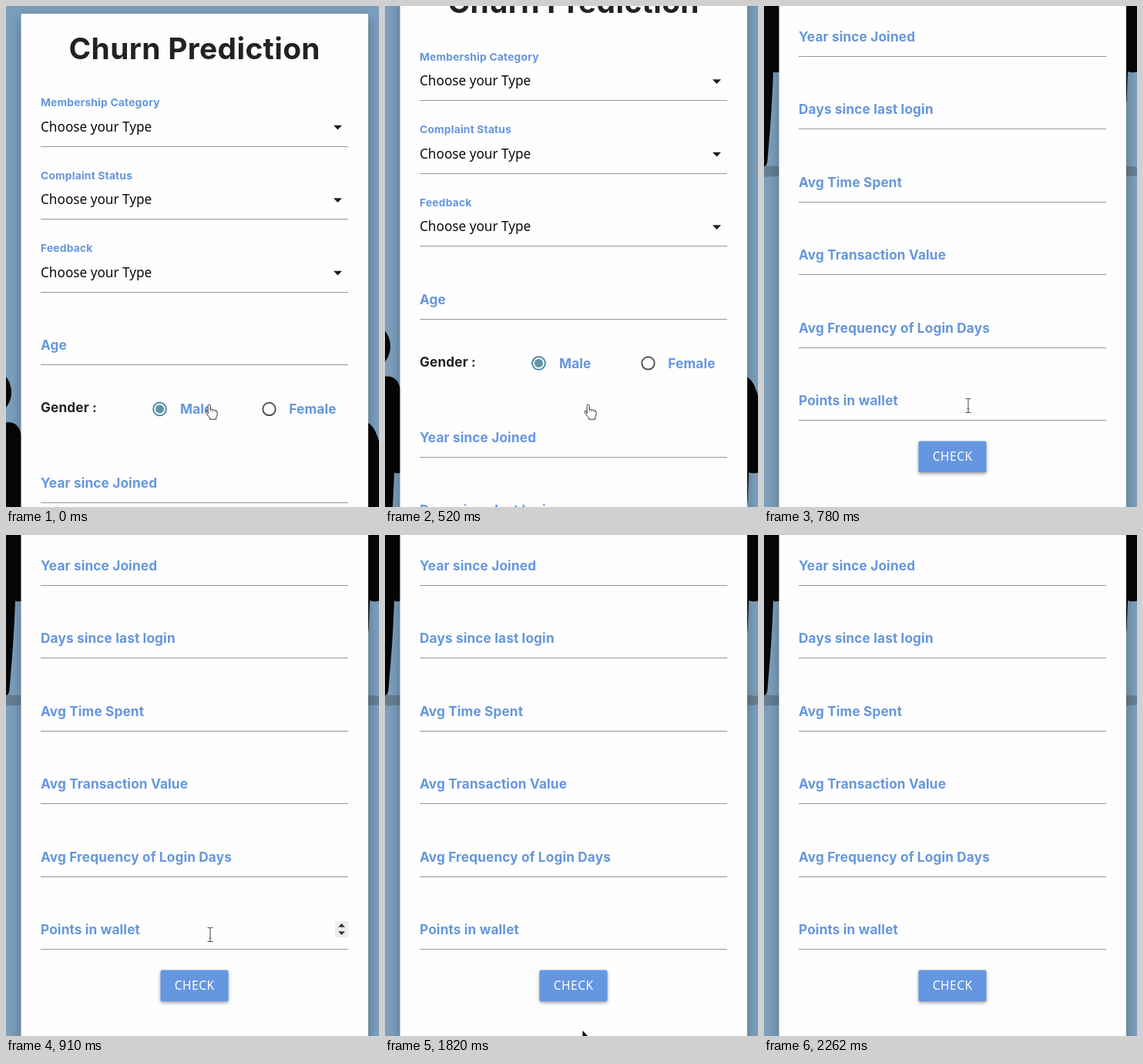
These frames come from a looping animation (484x650 px, 2470 ms). An HTML page:

```html
<!DOCTYPE html>
<html lang="en">
<head>
<meta charset="utf-8">
<title>Churn Prediction</title>
<style>
  html, body { margin: 0; width: 100%; height: 100%; overflow: hidden; background: #7b9fbd; }
  svg { display: block; width: 484px; height: 650px; }
  text { font-family: Inter, "Open Sans", sans-serif; font-weight: 650; font-optical-sizing: none; fill: #6596dd; }
  .title { font-size: 38.8px; font-weight: 700; letter-spacing: .4px; text-anchor: middle; fill: #222; }
  .field { font-size: 17.2px; letter-spacing: .15px; }
  .small { font-size: 13.8px; letter-spacing: .2px; }
  .dark { fill: #222; }
  .choice { font: 450 17.2px "Noto Sans", "Open Sans", sans-serif; fill: #0c0c0c; }
  .button { font: 400 15.5px "Noto Sans", "Open Sans", sans-serif; letter-spacing: .5px; text-anchor: middle; fill: #fff; }
  .line { fill: #969696; shape-rendering: crispEdges; }
  .card { fill: #fefefe; filter: drop-shadow(0 5px 8px rgba(0,0,0,.3)); }
  .raised { fill: #6596e0; filter: drop-shadow(0 2px 2px rgba(0,0,0,.38)); }
</style>
</head>
<body>
<svg viewBox="0 0 484 650">
  <rect width="484" height="650" fill="#7b9fbd"/>
  <g id="page">
    <g fill="#667f92">
      <ellipse cx="-30" cy="794" rx="90" ry="7.5"/>
      <ellipse cx="430" cy="794" rx="75" ry="8"/>
    </g>
    <g fill="#060708">
      <circle cx="-25" cy="501" r="32"/>
      <path d="M-10 540H3C12 540 17 545 20 556V665.5H17Q13 666.5 12 664.5C10.5 710 7.5 745 4.5 780Q4 788-2 788H-10Z"/>
      <path d="M460 541H470C477 545 482 555 486 573V664.5Q479 667 472 664.5L470.5 704H460Z"/>
    </g>
    <rect class="card" x="19.5" y="10" width="450.5" height="1260" rx="2"/>
    <text class="title" x="244.7" y="68.5">Churn Prediction</text>
    <g id="form"></g>
    <text class="field dark" x="45" y="527">Gender :</text>
    <circle cx="199.5" cy="522.9" r="8.4" fill="none" stroke="#4b8cad" stroke-width="2"/>
    <circle cx="199.5" cy="522.9" r="5.6" fill="#5f95a8"/>
    <text class="field" x="226" y="529">Male</text>
    <circle cx="341.5" cy="522.9" r="8.2" fill="none" stroke="#555" stroke-width="2"/>
    <text class="field" x="367.3" y="529">Female</text>
    <rect class="raised" x="200.5" y="1144" width="88" height="40.5" rx="2"/>
    <text class="button" x="244.7" y="1169.7">CHECK</text>
  </g>
  <g id="spinner">
    <rect x="-8.5" y="-10.5" width="17" height="21" fill="#ededed"/>
    <path d="M-4.3-2.8L0-7.5L4.3-2.8ZM-4.3 2.8L0 7.5L4.3 2.8Z" fill="#333"/>
  </g>
  <g id="hand" fill="#fff" stroke="#333" stroke-linejoin="round">
    <path d="M3.7 12V2Q3.7 .4 5.2 .4T6.8 2V7.2Q8.4 6 9.8 7.4Q11.4 6.6 12.7 8.2Q15.6 7.6 15.7 10.4V13.5Q15.4 16 14.2 17.3V19.6H6V17.5Q3.7 15.5 2.4 13L.6 10.5Q.1 9 1.4 8.7T3.7 10.6Z"/>
    <path d="M6.8 7V10M9.8 7.5V10.2M12.7 8.3V10.6" fill="none" stroke="#777" stroke-width=".8"/>
  </g>
  <path id="arrow" d="M0 0V15.2L3.5 12L6.2 18L8.5 17L5.8 11.2H10.2Z" fill="#0b0b0b" stroke="#fff" stroke-width=".8"/>
  <path id="beam" d="M-3.5-9H-1Q0-9 0-8Q0-9 1-9H3.5M0-8V8M-3.5 9H-1Q0 9 0 8Q0 9 1 9H3.5M-1.5 4.5H1.5" fill="none" stroke="#555" stroke-width="1.1"/>
</svg>
<script>
const $ = id => document.getElementById(id);
const PITCH = 94.5, LOOP = 2470;

const label = (name, cls, y) => `<text class="${cls}" x="45" y="${y}">${name}</text>`;
const rule = y => `<rect class="line" x="45" y="${y - .7}" width="399" height="1"/>`;
const input = (name, y) => label(name, "field", y - 20) + rule(y);
const select = (name, y) => label(name, "small", y - 52.5)
  + label("Choose your Type", "choice", y - 20)
  + `<path d="M425 ${y - 27.8}h11l-5.5 5.7z" fill="#1c1c1c"/>` + rule(y);

const selects = ["Membership Category", "Complaint Status", "Feedback"];
const inputs = ["Year since Joined", "Days since last login", "Avg Time Spent",
  "Avg Transaction Value", "Avg Frequency of Login Days", "Points in wallet"];

$("form").innerHTML = selects.map((n, i) => select(n, 182.5 + i * PITCH)).join("")
  + input("Age", 466)
  + inputs.map((n, i) => input(n, 645 + i * PITCH)).join("");

// The page jumps between scroll positions; each step holds until the next.
const steps = [
  { at: 0, scroll: 0, hand: [258.4, 516.6] },
  { at: 520, scroll: 59.5, hand: [258.4, 516.6] },
  { at: 650, scroll: 283.5, arrow: [264, 516], spinner: [435.5, 429.5] },
  { at: 780, scroll: 579.5, beam: [265, 518.5] },
  { at: 910, scroll: 579.5, beam: [265, 518.5], spinner: [435.5, 511.5] },
  { at: 1820, scroll: 579.5, arrow: [256, 642] },
  { at: 1950, scroll: 579.5 }
];

function place(id, pos) {
  $(id).style.display = pos ? "" : "none";
  if (pos) $(id).setAttribute("transform", `translate(${pos})`);
}

function draw(time) {
  const step = steps.findLast(s => s.at <= time);
  place("page", [0, -step.scroll]);
  for (const id of ["spinner", "hand", "arrow", "beam"]) place(id, step[id]);
}

const start = performance.now();
function tick() {
  draw((performance.now() - start) % LOOP);
  requestAnimationFrame(tick);
}
tick();
</script>
</body>
</html>
```
